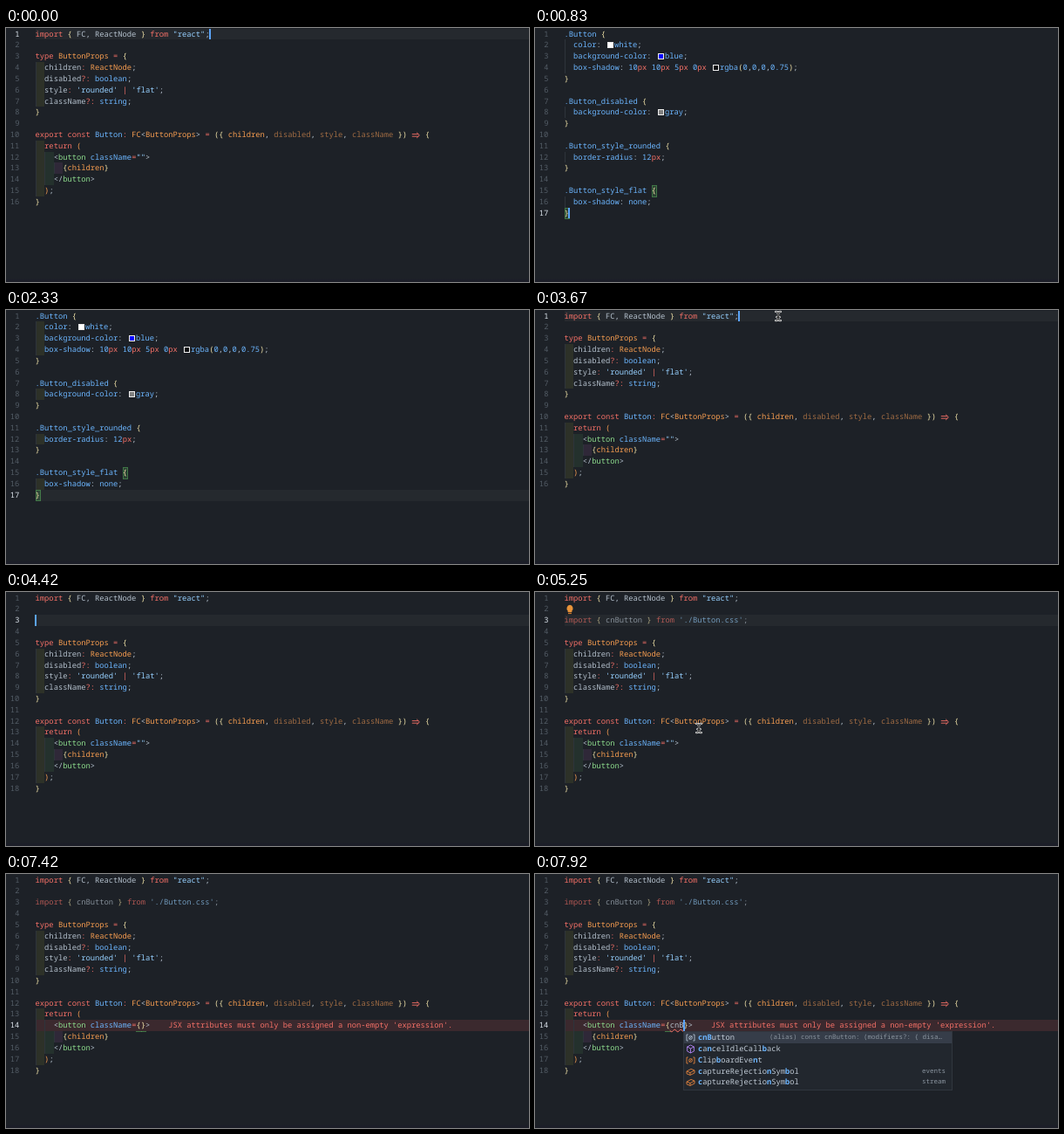
An HTML page that plays this animation: 600x291 px, repeating every 8000 ms.

```html
<!DOCTYPE html>
<html lang="en">
<head>
<meta charset="utf-8">
<title>Editor</title>
<style>
html, body { margin: 0; width: 100%; height: 100%; overflow: hidden; background: #1d2127; }
#stage {
  position: relative; width: 600px; height: 291px; overflow: hidden; isolation: isolate;
  background: linear-gradient(#1d2127 287px, #1c1e28 288px);
  font: 500 8.775px/12.82px "Noto Sans Mono", "DejaVu Sans Mono", monospace;
  font-variant-ligatures: none; text-rendering: geometricPrecision; color: #adbac7;
}
#stage div, #stage span, #stage svg { position: absolute; white-space: pre; }
.row { left: 33.6px; height: 12.82px; }
.back { z-index: -1; height: 12.82px; }
.num { left: 0; width: 15.4px; text-align: right; font-weight: 400; }
.k { color: #f47067 } .o { color: #f69d50 } .s { color: #96d0ff } .b { color: #6cb6ff }
.g { color: #8ddb8c } .f { color: #b4c0cc } .y { color: #f0e2a8 } .d { color: #9f6b43 }
.e { color: #b4c0cc; text-decoration: underline wavy #f47067 .6px; text-underline-offset: 1px }
.arrow { stroke: #f47067 }
.pending .arrow { stroke: #7d8796 }
.broken { font-style: italic }
.faded { opacity: .67 }
.guide { width: 1px; height: 12.82px; background: #2e343b }
.swatch { width: 5px; height: 5px; top: 2.6px; border: 1px solid #eee }
.match { z-index: -1; width: 4.3px; height: 11.6px; background: #57ab5a38; border: .6px solid #57ab5a80 }
.caret { width: 1.6px; height: 12.6px; background: #5ba4f8 }
.popup { left: 170px; top: 179.8px; width: 307px; background: #22272e; border: .5px solid #30363e; overflow: hidden }
.item { left: 0; width: 307px; height: 12.82px }
.item:first-child { background: #363d49 }
.label { left: 16px; color: #c0cad5 }
.label b { color: #6cb6ff; font-weight: 700 }
.detail { right: 7px; font-size: 7.5px; color: #8a949f; font-weight: 400 }
.item:first-child .detail { right: 11px }
svg { fill: none; overflow: visible }
</style>
</head>
<body>
<div id="stage"></div>
<script>
const LOOP = 8000, CW = 5.265, LH = 12.82, X0 = 33.6, Y0 = 0.65;
const stage = document.getElementById('stage');
const parts = [];

const rowTop = n => Y0 + (n - 1) * LH;
const colLeft = c => X0 + c * CW;

function make(tag, cls, parent, style = {}, html = '') {
  const el = document.createElement(tag);
  el.className = cls;
  for (const key in style) {
    const v = style[key];
    el.style[key] = typeof v === 'number' ? v + 'px' : v;
  }
  el.innerHTML = html;
  parent.append(el);
  return el;
}

// Shows an element only during the given [from, to) spans.
function during(el, spans) {
  parts.push({ el, spans });
  return el;
}

const escapeText = s => s.replace(/&/g, '&amp;').replace(/</g, '&lt;');

const ARROW = `<svg class="arrow" width="11" height="13" stroke-width=".9">
  <path d="M.8 5.6H8.2M.8 8.2H8.2M6.2 3.8L9.4 6.9L6.2 10"/></svg>`;

// Markup: "~" + style letter + text; "~@colour" is a swatch, "~>" a double arrow.
function row(n, markup, spans, cls = '') {
  const el = during(make('div', 'row ' + cls, stage, { top: rowTop(n) }), spans);
  const indent = markup.slice(2).match(/^ */)[0].length;
  for (let c = 0; c < indent; c += 2) make('div', 'guide', el, { left: c * CW });
  let x = 0;
  for (const piece of markup.split('~').slice(1)) {
    const kind = piece[0], text = piece.slice(1);
    if (kind === '@') {
      make('span', 'swatch', el, { left: x + 1.8, background: text });
      x += 10;
    } else if (kind === '>') {
      make('span', '', el, { left: x }, ARROW);
      x += 2 * CW;
    } else {
      const lead = text.match(/^ */)[0].length;
      make('span', kind, el, { left: x + lead * CW }, escapeText(text.slice(lead)));
      x += text.length * CW;
    }
  }
  return el;
}

const TINTS = ['#ffff4012', '#7fff7f12', '#ff7fff14'];
function tint(n, depth, spans) {
  for (let i = 0; i < depth; i++)
    during(make('div', 'back', stage, { left: colLeft(2 * i), top: rowTop(n), width: 2 * CW, background: TINTS[i] }), spans);
}

function block(first, lines, spans, tintSpans) {
  lines.forEach((line, i) => {
    if (!line) return;
    row(first + i, line, spans);
    tint(first + i, line.slice(2).match(/^ */)[0].length / 2, tintSpans);
  });
}

function match(n, col, spans) {
  during(make('div', 'match', stage, { left: colLeft(col), top: rowTop(n) }), spans);
}

function bar(n, color, spans) {
  during(make('div', 'back', stage, { left: X0, right: 0, top: rowTop(n), background: color }), spans);
}

// Moments
const TO_CSS = 600, TO_TSX = 3200, ENTER = 4300, PASTE = 4480, UNUSED = 4900, CLICK = 6000,
  ERASE = 6500, BRACE = 6900, ERROR = 7200, TYPE_C = 7580, TYPE_N = 7700, TYPE_B = 7830;
const CURRENT_LINE = '#25292e';

// Text
const importReact = '~kimport ~y{~f FC, ReactNode ~y}~k from ~s"react"~f;';
const importStyle = "~kimport ~y{~f cnButton ~y}~k from ~s'./Button.css'~f;";
const propsType = [
  '~ktype ~oButtonProps ~k= ~y{',
  '~f  children~k: ~oReactNode~f;',
  '~f  disabled~k?: ~bboolean~f;',
  "~f  style~k: ~s'rounded' ~k| ~s'flat'~f;",
  '~f  className~k?: ~bstring~f;',
  '~y}',
  '',
  '~kexport const ~bButton~k: ~oFC~f<~oButtonProps~f> ~k= ~y({ ~ochildren~f, ~ddisabled~f, ~dstyle~f, ~dclassName ~y}) ~>~y {',
  '~k  return ~o(',
];
const tagStart = '~f    <~gbutton ~bclassName';
const emptyTag = tagStart + '~k=~s""~f>';
const child = '~y      {~ochildren~y}';
const closing = ['~f    </~gbutton~f>', '~o  )~f;', '~y}'];

const styles = [
  '~b.Button ~y{',
  '~b  color~f: ~@#fff~bwhite~f;',
  '~b  background-color~f: ~@#00f~bblue~f;',
  '~b  box-shadow~f: ~b10~kpx ~b10~kpx ~b5~kpx ~b0~kpx ~@#0c0e11~brgba~y(~b0~f,~b0~f,~b0~f,~b0.75~y)~f;',
  '~y}', '',
  '~b.Button_disabled ~y{',
  '~b  background-color~f: ~@#808080~bgray~f;',
  '~y}', '',
  '~b.Button_style_rounded ~y{',
  '~b  border-radius~f: ~b12~kpx~f;',
  '~y}', '',
  '~b.Button_style_flat ~y{',
  '~b  box-shadow~f: ~bnone~f;',
  '~y}',
];

// Component before the edit
const before = [[0, TO_CSS], [TO_TSX, ENTER]];
block(1, [importReact, '', ...propsType, emptyTag, child, ...closing], before, [[0, TO_CSS], [3500, ENTER]]);
bar(1, CURRENT_LINE, before);

// Style sheet
block(1, styles, [[TO_CSS, TO_TSX]], [[1000, TO_TSX]]);
bar(17, CURRENT_LINE, [[1000, TO_TSX]]);
match(15, 19, [[TO_CSS, TO_TSX]]);
match(17, 0, [[TO_CSS, TO_TSX]]);

// Component during the edit
const edit = [[ENTER, LOOP]], torn = [[ERASE, BRACE]];
block(1, [importReact], edit, edit);
row(3, importStyle, [[PASTE, UNUSED]]);
row(3, importStyle, [[UNUSED, LOOP]], 'faded');
bar(3, CURRENT_LINE, [[ENTER, CLICK]]);
block(5, propsType, edit, edit);
block(15, [child], edit, edit);
block(16, closing, [[ENTER, ERASE], [BRACE, LOOP]], edit);
['~k    </button>', '~o  );', '~y}'].forEach((line, i) => row(16 + i, line, torn, 'broken'));
match(13, 9, torn);
match(17, 2, torn);

tint(14, 2, edit);
row(14, emptyTag, [[ENTER, ERASE]]);
row(14, tagStart + '~>', torn, 'pending');
const message = "JSX attributes must only be assigned a non-empty 'expression'.";
[['', BRACE, TYPE_C], ['c', TYPE_C, TYPE_N], ['cn', TYPE_N, TYPE_B], ['cnB', TYPE_B, LOOP]].forEach(([typed, from, to]) => {
  row(14, `${tagStart}~k=~y{~e${typed}~y}~f>`, [[from, to]]);
  row(14, '~k' + message, [[Math.max(from, ERROR), to]]).style.left = colLeft(29 + typed.length) + 'px';
  match(14, 22, [[from, to]]);
  match(14, 23 + typed.length, [[from, to]]);
});
bar(14, CURRENT_LINE, [[CLICK, ERROR]]);
bar(14, '#3b292e', [[ERROR, LOOP]]);

// Light bulb
during(make('div', '', stage, { left: 35, top: 13.5 }, `<svg width="10" height="12">
  <path d="M5 .8A4 4 0 0 0 2.6 7.6V9H7.4V7.6A4 4 0 0 0 5 .8Z" fill="#e8933a"/>
  <path d="M3 10.4H7" stroke="#c9782c" stroke-width="1.4"/></svg>`), [[UNUSED, CLICK]]);

// Suggestions
const icon = {
  value: 'M2.6 2H1V9H2.6M8.4 2H10V9H8.4M3.6 5.5a1.9 1.9 0 1 0 3.8 0a1.9 1.9 0 1 0-3.8 0M3.8 7.4L7.2 3.6',
  cube: 'M5.5 1L9.4 3V8L5.5 10L1.6 8V3ZM1.6 3L5.5 5L9.4 3M5.5 5V10',
  box: 'M1 5L6 2.4L10 4V7L5 9.4L1 7.8ZM1 5L5 6.6L10 4M5 6.6V9.4',
};
const GREY = '#b4c3d4', PURPLE = '#b083f0', ORANGE = '#e0823d';

function mark(text, query) {
  let i = 0;
  return [...text].map(ch =>
    i < query.length && ch.toLowerCase() === query[i] ? (i++, `<b>${ch}</b>`) : ch).join('');
}

function popup(query, items, spans) {
  const el = during(make('div', 'popup', stage, { height: items.length * LH + 2.2 }), spans);
  items.forEach(([text, shape, color, detail = '', own = query], i) => {
    const item = make('div', 'item', el, { top: i * LH + 0.4 },
      `<svg style="left:2px;top:1px" width="11" height="11" stroke="${color}" stroke-width=".9"><path d="${icon[shape]}"/></svg>`);
    make('span', 'label', item, {}, mark(text, own));
    make('span', 'detail', item, {}, detail);
  });
}

const chosen = ['cnButton', 'value', GREY, '(alias) const cnButton: (modifiers?: { disa…'];
const idle = ['cancelIdleCallback', 'cube', PURPLE];
const capture = ['events', 'stream'].map(d => ['captureRejectionSymbol', 'box', ORANGE, d]);
const wide = [
  ['children', 'value', GREY], ['className', 'value', GREY], chosen,
  ['caches', 'value', ORANGE], ['cancelAnimationFrame', 'cube', PURPLE], idle,
  ['clearInterval', 'cube', PURPLE], ['clearTimeout', 'cube', PURPLE], ['console', 'value', ORANGE],
];
const narrow = [chosen, ['cancelAnimationFrame', 'cube', PURPLE], idle,
  ['clearInterval', 'cube', PURPLE], ['console', 'value', ORANGE], ['confirm', 'cube', PURPLE], ...capture, ['connect', 'cube', PURPLE]];
popup('c', wide, [[TYPE_C + 60, TYPE_N]]);
popup('cn', narrow, [[TYPE_N, TYPE_B]]);
popup('cnb', [chosen, idle, ['ClipboardEvent', 'value', ORANGE, '', 'cbn'], ...capture], [[TYPE_B, LOOP]]);

// Caret: time, row, column; each step restarts the blink.
const carets = [
  [0, 1, 38], [TO_CSS, 17, 1], [TO_TSX, 1, 38], [ENTER, 3, 0], [PASTE, 3, 39], [CLICK, 14, 23],
  [ERASE, 14, 22], [BRACE, 14, 23], [TYPE_C, 14, 24], [TYPE_N, 14, 25], [TYPE_B, 14, 26],
];
const caret = make('div', 'caret', stage);

const numbers = Array.from({ length: 18 }, (_, i) => make('div', 'num', stage, { top: rowTop(i + 1) }, i + 1));

// Pointer: time, x, y
const path = [[3540, 279, -8], [3660, 279, 7], [5020, 279, 7], [5250, 188, 156], [5650, 153, 174], [ERASE, 153, 174]];
const beam = 'M-2.8-5.2Q0-5 0-3V3Q0 5-2.8 5.2M2.8-5.2Q0-5 0-3V3Q0 5 2.8 5.2M-1.6 1.2H1.6';
const pointer = during(make('div', '', stage, { left: 0, top: 0 }, `<svg width="1" height="1" stroke-linecap="round">
  <path d="${beam}" stroke="#fff" stroke-width="2.3"/><path d="${beam}" stroke="#111" stroke-width=".9"/></svg>`),
  [[3540, ENTER], [5000, ERASE]]);

function pointerAt(t) {
  const i = path.findIndex(p => p[0] > t);
  if (i < 1) return path[i < 0 ? path.length - 1 : 0].slice(1);
  const [a, b] = [path[i - 1], path[i]];
  const u = (t - a[0]) / (b[0] - a[0]), e = u * u * (3 - 2 * u);
  return [a[1] + (b[1] - a[1]) * e, a[2] + (b[2] - a[2]) * e];
}

function draw(t) {
  for (const { el, spans } of parts) el.hidden = !spans.some(([from, to]) => t >= from && t < to);

  const [since, line, col] = carets.findLast(c => c[0] <= t);
  caret.hidden = (t - since) % 1000 >= 500;
  caret.style.left = colLeft(col) - 0.4 + 'px';
  caret.style.top = rowTop(line) + 'px';

  const count = t >= ENTER ? 18 : t >= TO_CSS && t < TO_TSX ? 17 : 16;
  numbers.forEach((el, i) => {
    el.hidden = i >= count;
    el.style.color = i + 1 === line ? '#dbe3eb' : '#535c66';
  });

  const [x, y] = pointerAt(t);
  pointer.style.transform = `translate(${x}px, ${y}px)`;
}

const start = performance.now();
function tick() {
  draw((performance.now() - start) % LOOP);
  requestAnimationFrame(tick);
}
draw(0);
requestAnimationFrame(tick);
</script>
</body>
</html>
```
